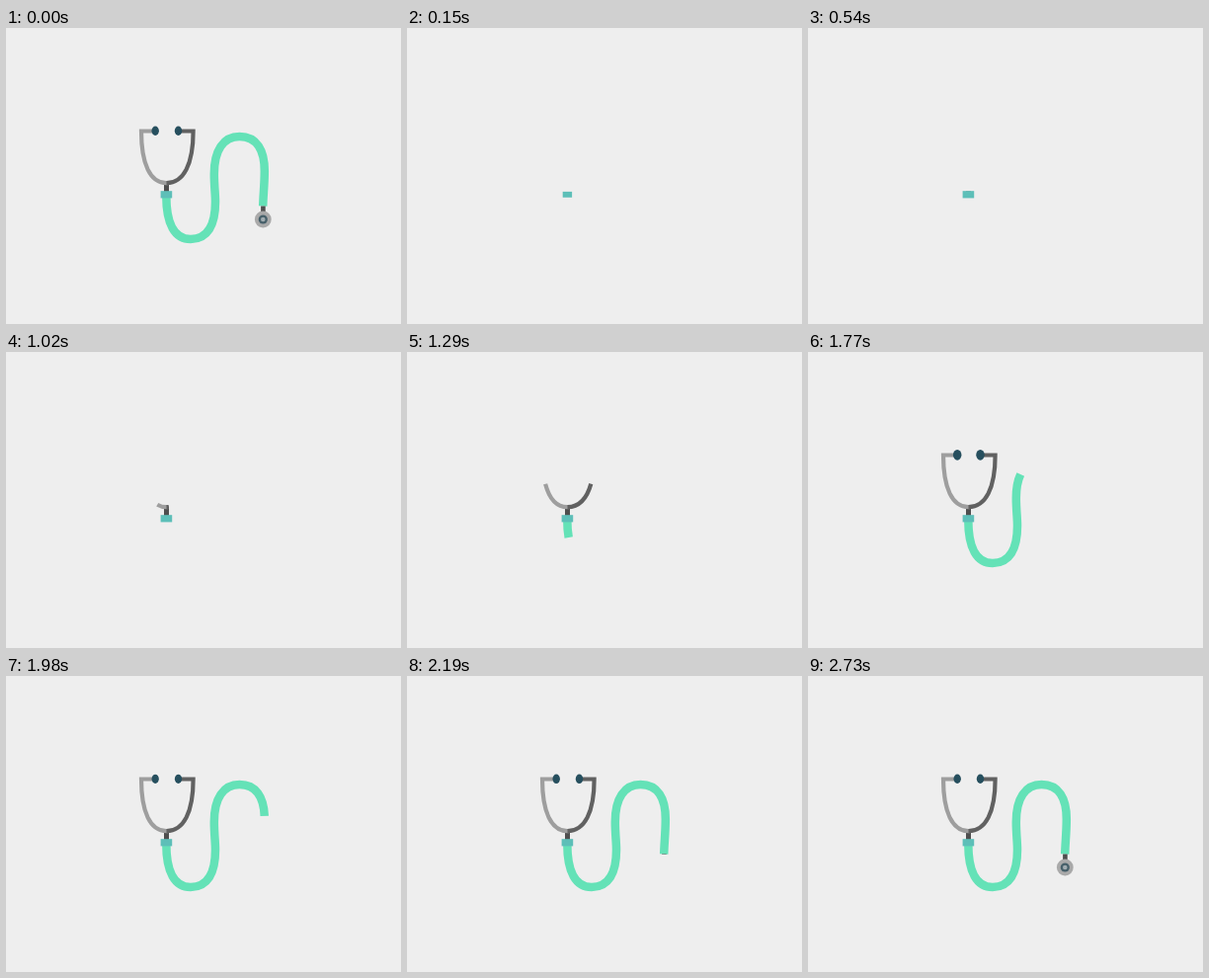
Animation of 400 by 300 pixels, one loop 3270 ms. Source, as an HTML page:

```html
<!DOCTYPE html>
<html lang="en">
<head>
<meta charset="utf-8">
<title>Stethoscope</title>
<style>
  html, body { margin: 0; width: 100%; height: 100%; overflow: hidden; background: #eee; }
  svg { display: block; width: 100vw; height: 100vh; }
  path { fill: none; }
</style>
</head>
<body>
<svg viewBox="0 0 400 300">
  <path id="hose" pathLength="1" stroke="#64e2b7" stroke-width="8.5"
    d="M162.3 170C162.3 199 171 214 187 214C204 214 212 200 212 176C212 168 210.8 160 210.8 148C210.8 124 220 110 236.5 110C254 110 261.8 124 261.8 145C261.8 158 260.6 168 260.2 180.5"/>
  <path id="stem" pathLength="1" stroke="#4e4e4e" stroke-width="5" d="M162.5 166V156.5"/>
  <path id="left" pathLength="1" stroke="#9e9e9e" stroke-width="4.2"
    d="M164 157.2H162.5C146 157 137 138 137 104.5H151"/>
  <path id="right" pathLength="1" stroke="#616161" stroke-width="4.2"
    d="M162.5 157.2C180 157 189.6 138 189.6 104.5H175"/>
  <g id="collar"><rect x="-5.8" y="-3.6" width="11.6" height="7.2" fill="#5dbfb8"/></g>
  <g id="tipL"><ellipse rx="3.7" ry="4.7" fill="#264f5e"/></g>
  <g id="tipR"><ellipse rx="3.7" ry="4.7" fill="#264f5e"/></g>
  <path id="neck" pathLength="1" stroke="#4e4e4e" stroke-width="4.6" d="M260.4 180.5V188"/>
  <g id="head">
    <circle r="8.4" fill="#a9a9a9"/>
    <circle r="4.6" fill="#47606a"/>
    <circle r="2.3" fill="#a0abb0"/>
  </g>
</svg>
<script>
const LOOP = 3270, STEP = 30, DONE = 2730;
const el = id => document.getElementById(id);

// Drawn fraction of each stroke: [ms, fraction]
const strokes = {
  stem:  [[510, 0], [750, .5], [960, 1]],
  left:  [[930, 0], [1020, .14], [1050, .18], [1500, .715], [1590, .86], [1680, 1]],
  right: [[1000, 0], [1050, .08], [1500, .77], [1590, .9], [1680, 1]],
  hose:  [[1170, 0], [1500, .22], [1590, .31], [1770, .59], [2160, 1]],
  neck:  [[2180, 0], [2300, 1]]
};

// Springy parts: centre, start and duration
const pops = {
  tipL: [151.2, 104.3, 1640, 640],
  tipR: [174.5, 104.3, 1640, 640],
  head: [260.3, 194, 2230, 500]
};

// Smooth monotone curve through the keys
function curve(keys, t) {
  const n = keys.length - 1;
  if (t <= keys[0][0]) return keys[0][1];
  if (t >= keys[n][0]) return keys[n][1];
  const slope = i => (keys[i + 1][1] - keys[i][1]) / (keys[i + 1][0] - keys[i][0]);
  const tangent = i => {
    if (i === 0) return slope(0) * .7;
    if (i === n) return slope(n - 1) * .3;
    const a = slope(i - 1), b = slope(i);
    return 2 * a * b / (a + b);
  };
  let i = 0;
  while (t > keys[i + 1][0]) i++;
  const [x0, y0] = keys[i], [x1, y1] = keys[i + 1];
  const w = x1 - x0, u = (t - x0) / w, v = 1 - u;
  return v * v * (1 + 2 * u) * y0 + u * u * (3 - 2 * u) * y1
    + w * u * v * (v * tangent(i) - u * tangent(i + 1));
}

const clamp = x => Math.min(1, Math.max(0, x));
const easeOut = u => 1 - (1 - u) ** 3;
const spring = u => u <= 0 ? 0 : u >= 1 ? 1 : 1 - Math.exp(-7 * u) * Math.cos(11 * u);

function place(id, x, y, scale) {
  const g = el(id);
  g.setAttribute('transform', `translate(${x} ${y}) scale(${scale})`);
  g.style.display = scale > 0 ? '' : 'none';
}

function draw(ms) {
  // The loop opens on the finished picture, then starts empty
  const t = ms < STEP ? DONE : Math.floor(ms / STEP) * STEP;
  for (const id in strokes) {
    const p = curve(strokes[id], t), path = el(id);
    path.style.display = p > 0 ? '' : 'none';
    path.style.strokeDasharray = p < 1 ? `${p} 2` : 'none';
  }
  for (const id in pops) {
    const [x, y, start, span] = pops[id];
    place(id, x, y, spring((t - start) / span));
  }
  place('collar', 162.4, 168.8, easeOut(clamp((t - 60) / 210)));
}

const origin = performance.now();
function tick() {
  draw((performance.now() - origin) % LOOP);
  requestAnimationFrame(tick);
}
tick();
</script>
</body>
</html>
```
